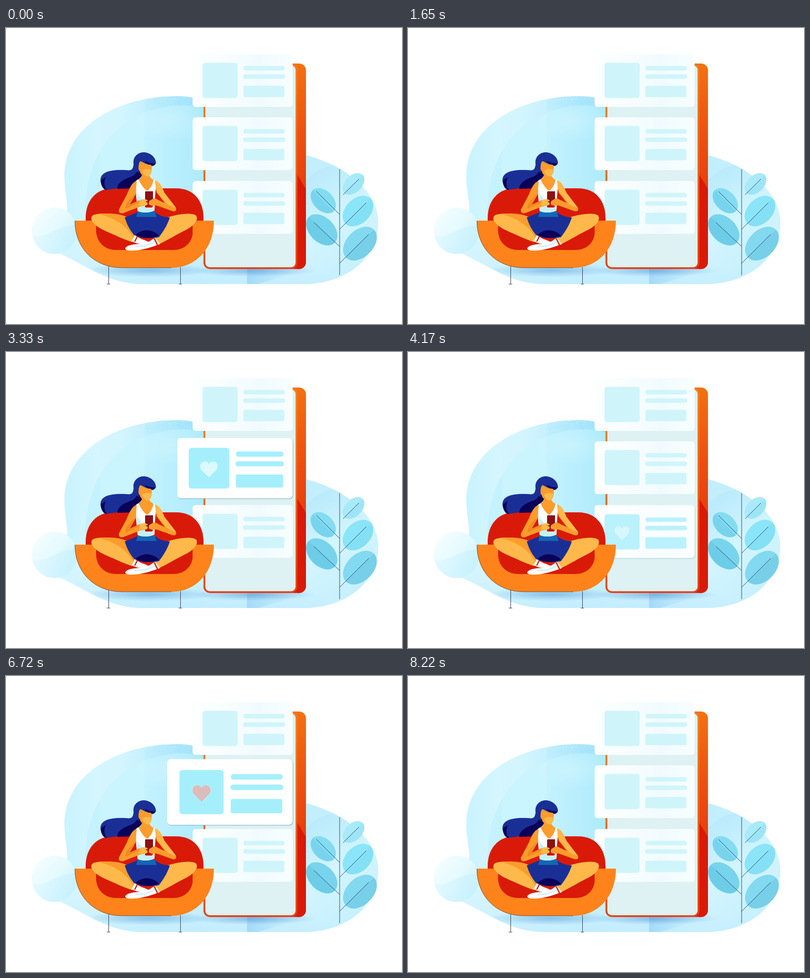
Animation, 800 px wide and 600 px high, one loop 8.52 s. Source, as an HTML page with a canvas:

```html
<!DOCTYPE html>
<html lang="en">
<head>
<meta charset="utf-8">
<title>Browsing cards</title>
<style>
  html, body { margin: 0; width: 100%; height: 100%; overflow: hidden; background: #fff; }
  canvas { display: block; }
</style>
</head>
<body>
<canvas id="stage" width="800" height="600"></canvas>
<script>
const LOOP = 8520, STEP = 30, GROWTH = 0.256, RIGHT = 579;
const NAVY = '#1a2f96', INK = '#0a0358', RED = '#d91a08', SKIN = '#ffb94a', TAN = '#fb9c2c', CYAN = '#a5effd';

const ctx = document.getElementById('stage').getContext('2d');
const makeLayer = () => {
  const c = document.createElement('canvas');
  c.width = 800;
  c.height = 600;
  return c.getContext('2d');
};

const shape = (g, d, color) => { g.fillStyle = color; g.fill(new Path2D(d)); };
const line = (g, d, color, width = 1) => {
  g.strokeStyle = color;
  g.lineWidth = width;
  g.stroke(new Path2D(d));
};
const box = (g, x, y, w, h, r, color) => {
  g.fillStyle = color;
  g.beginPath();
  g.roundRect(x, y, w, h, r);
  g.fill();
};
const oval = (g, x, y, rx, ry, angle, color) => {
  g.fillStyle = color;
  g.beginPath();
  g.ellipse(x, y, rx, ry, angle * Math.PI / 180, 0, 7);
  g.fill();
};
const blend = (g, x0, y0, x1, y1, ...colors) => {
  const fill = g.createLinearGradient(x0, y0, x1, y1);
  colors.forEach((c, i) => fill.addColorStop(i / (colors.length - 1), c));
  return fill;
};
const glow = (g, x, y, rx, ry, color) => {
  g.save();
  g.translate(x, y);
  g.scale(1, ry / rx);
  const fill = g.createRadialGradient(0, 0, 0, 0, 0, rx);
  fill.addColorStop(0, `rgba(${color})`);
  fill.addColorStop(1, `rgba(${color.replace(/[^,]+$/, '0')})`);
  oval(g, 0, 0, rx, rx, 0, fill);
  g.restore();
};

// ---------- Static scene ----------

function drawBackdrop(g) {
  const blob = 'M118 300 C118 200 225 138 345 138 C450 138 500 232 606 258 C680 276 752 330 752 392 ' +
    'C752 465 690 519 600 519 L275 519 C205 518 165 482 108 457 L124 365 C122 340 118 320 118 300Z';
  g.save();
  g.clip(new Path2D(blob));
  g.fillStyle = blend(g, 100, 0, 752, 0, '#d2f6ff', '#cff4fe', '#a4e4fc', '#a8e4fb', '#c3effd', '#c2effd');
  g.fillRect(0, 0, 800, 600);
  g.fillStyle = blend(g, 118, 0, 190, 0, 'rgba(190,240,254,.45)', 'rgba(222,249,255,.4)');
  g.fillRect(100, 130, 90, 260);
  shape(g, 'M160 390 C155 235 245 157 360 157 C430 157 480 220 520 290 L520 400Z',
    blend(g, 160, 0, 400, 0, '#c4f2fe', '#c4f2fe', '#aeebfc'));
  g.fillStyle = 'rgba(222,248,255,.2)';
  g.fillRect(190, 130, 90, 260);
  glow(g, 330, 190, 80, 40, '225,250,255,.35');
  g.fillStyle = blend(g, 0, 380, 0, 519, 'rgba(220,247,255,0)', 'rgba(214,245,255,.75)', 'rgba(198,238,254,.9)');
  g.fillRect(100, 380, 660, 140);
  oval(g, 670, 390, 92, 112, 0, blend(g, 600, 280, 730, 500, '#b4e8fb', '#d3f5fe', '#c4effd'));
  shape(g, 'M487 488 H600 C570 500 540 510 510 519 H487Z',
    blend(g, 487, 0, 600, 0, 'rgba(130,198,240,.5)', 'rgba(190,232,252,.1)'));
  glow(g, 290, 491, 130, 14, '92,160,215,.6');
  glow(g, 500, 492, 125, 12, '80,145,210,.55');

  let seed = 7;
  const random = () => (seed = seed * 16807 % 2147483647) / 2147483647;
  g.fillStyle = 'rgba(255,255,255,.45)';
  for (let i = 0; i < 160; i++) g.fillRect(255 + random() * 115, 138 + random() ** 2 * 24, 1, 1);
  g.restore();

  oval(g, 98, 411, 46, 47, 0, blend(g, 62, 380, 135, 440, '#f3fdff', '#e4faff', '#c6f2fe'));
  shape(g, 'M54 420 C80 432 105 395 143 402 C146 432 128 458 98 458 C75 458 58 442 54 420Z',
    blend(g, 60, 410, 135, 445, '#e4f9ff', '#c6f1fe'));
}

function drawPlant(g) {
  const leaves = [
    [702, 316, 26, 17, -45, '#a9eaf8', '#9de5f6'],
    [641, 350, 30, 20, 45, '#83dcf1', '#78d4ec'],
    [711, 371, 36, 25, -45, '#8be5f8', '#84e0f4'],
    [638, 409, 37, 25, 45, '#78d4ec', '#6dcde7'],
    [715, 437, 40, 27, -45, '#83d9ef', '#77cfe8']
  ];
  for (const [x, y, rx, ry, angle, light, dark] of leaves) {
    oval(g, x, y, rx, ry, angle, light);
    g.save();
    g.translate(x, y);
    g.rotate(angle * Math.PI / 180);
    shape(g, `M${-rx} 0 A${rx} ${ry} 0 0 0 ${rx} 0Z`, dark);
    g.restore();
  }
  line(g, 'M674 286 V501 M681 338 L713 306 M627 331 L674 378 M674 408 L728 354 M622 394 L674 443 M674 477 L733 418',
    '#2b4680');
}

function drawDevice(g) {
  box(g, 399, 72, 207, 416.5, 14, blend(g, 0, 72, 0, 488, '#f4710f', '#ec5210', '#e63c0c', RED));
  g.save();
  g.beginPath();
  g.roundRect(399, 72, 207, 416.5, 14);
  g.clip();
  shape(g, 'M588 297 L606 326 V489 H588Z', RED);
  g.restore();
  box(g, 399, 73, 189.5, 415, 12, blend(g, 0, 73, 0, 488, '#f58122', '#f0641a', '#e8400f'));
  box(g, 402.5, 76, 182.5, 409, 9, '#def1f3');
}

const cardTops = [53, 181, 310.3];

function drawCardFace(g, y, color) {
  box(g, 397, y + 17.5, 71, 71.5, 5, color);
  box(g, 479.5, y + 24, 83.5, 9, 4.5, color);
  box(g, 479, y + 41, 85, 9, 4.5, color);
  box(g, 479.5, y + 64.3, 82.8, 23, 3, color);
}

function drawRestingCards(g) {
  for (const y of cardTops) {
    box(g, 377, y, 202, 107, 6, blend(g, 377, 0, 579, 0, '#fdffff', '#f8fdff', '#f1fbff', '#f8feff'));
    drawCardFace(g, y, '#cff5fb');
  }
}

function drawSofa(g) {
  line(g, 'M207.5 482 V519 M203.5 519 H210.5 M352.5 485 V519 M349 519 H355.5', '#2f3b58');
  shape(g, 'M161 400 V385 C161 350 182 325 216 325 H344 C379 325 399 350 399 385 V400Z', RED);
  shape(g, 'M139 390.5 H420 C420 446 385 486 334 486 H234 C178 486 139 446 139 390.5Z', '#ff831b');
  line(g, 'M139.3 391 C139.3 446 178 486 234 486 H334', '#5a3a35', 0.8);
  shape(g, 'M182 388 H377 V418 C374 438 358 450 338 450 H222 C200 450 182 434 182 410Z', RED);
}

function drawWoman(g) {
  // hair behind the body
  shape(g, 'M259 270 C256 284 258 290 243 288 C211 286 190 292 191 309 C192 322 198 328 204 328 ' +
    'C226 324 244 325 258 313 C270 305 276 301 277 291 L270 268Z', NAVY);
  shape(g, 'M225 326 C224 314 239 306 254 301 C265 297 268 282 267 268 L277 290 C275 302 270 306 262 309 L258 325Z', INK);
  shape(g, 'M191 309 C193 322 198 329 204 328 C197 320 198 309 202 302Z', INK);

  // legs and shorts
  shape(g, 'M244 383 C216 376 183 373 174 381 C168 390 180 402 200 411 C222 421 240 429 255 434 L266 422 C255 409 248 398 244 383Z', SKIN);
  shape(g, 'M190 378 C215 373 235 379 244 383 L264 422 L258 427 C247 405 225 386 190 378Z', TAN);
  shape(g, 'M320 386 C345 377 374 373 384 380 C390 388 380 402 360 411 C338 422 320 434 307 439 L299 424 C309 412 316 400 320 386Z', SKIN);
  shape(g, 'M240 384 L267 373 H301 C310 381 320 383 331 384 C326 400 318 412 309 424 C290 428 270 426 259 420 C250 409 244 398 240 384Z', NAVY);
  shape(g, 'M262 419 C270 412 278 410 284 410 C294 410 303 414 309 421 C294 428 272 427 262 419Z', INK);
  shape(g, 'M266 372 H301 L304 383 H263Z', '#1267b4');

  // feet
  shape(g, 'M260 420 L270 426 C278 430 288 432 291 436 C278 440 263 438 254 432Z', '#fff');
  line(g, 'M265.5 422 L260 433', RED, 2.5);
  shape(g, 'M301 425 L311 438 C294 444 278 450 258 451 C247 452 240 450 241 446 C246 439 260 438 272 438 C284 437 291 432 301 425Z', '#fff');
  shape(g, 'M265 440 C280 442 292 437 301 429 L303 432 C294 442 278 446 258 444Z', '#d6f4fa');
  line(g, 'M299.5 426.5 L306 440', RED, 2.5);

  // torso
  shape(g, 'M263 309 C270 306 275 304 275 294 H289 C289 303 294 306 301 309 L306 325 L287 340 L263 330Z', TAN);
  shape(g, 'M264 309 L268 307 C272 317 279 326 285 330 C291 326 297 317 298 307 L302 309 ' +
    'C304 324 301 333 301 345 L300 370 C290 375 275 375 266 371 C264 345 260 330 264 309Z', '#fff');
  shape(g, 'M264 331 C270 345 282 355 298 358 L300 370 C290 375 275 375 266 371Z', '#c5f1fa');

  // arms, handset and hands
  shape(g, 'M264 310 C255 312 249 325 244 338 L228 368 C227 376 233 377 240 374 L271 362 L285 360 L284 348 L270 349 L250 358 L262 337Z', TAN);
  shape(g, 'M262 334 L248 359 L270 350 L268 354 L242 366 C240 362 244 355 250 347Z', '#f08820');
  shape(g, 'M301 309 C311 312 315 322 320 334 L343 364 C346 372 340 373 333 370 L305 360 L297 359 L294 349 L302 346 L321 355 L304 333Z', TAN);
  shape(g, 'M302 310 C311 312 315 322 320 334 L343 364 C338 365 332 360 324 356 L304 331Z', SKIN);
  box(g, 283, 331, 16, 34, 3, '#fff');
  box(g, 281, 331, 15.5, 33, 2.5, '#c9140c');
  shape(g, 'M282 331 H297 V352 L281 363 V333Z', '#8d1016');
  shape(g, 'M270 350 L277 347 C284 347 287 349 286 351 L281 352 L286 354 L286 358 C280 362 273 361 269 360Z', SKIN);
  shape(g, 'M306 348 L300 345 C295 347 292 349 289 351 L288 357 C293 361 299 361 305 358Z', TAN);

  // head
  shape(g, 'M267 272 C267 263 282 262 292 268 C297 278 295 294 288 299 C281 302 272 299 270 290 C266 286 266 280 267 272Z', TAN);
  shape(g, 'M275 289 C280 285 290 285 295 288 C294 295 291 300 286 301 C280 300 277 296 275 289Z', SKIN);
  shape(g, 'M258 277 C255 262 266 252 278 252 C291 252 303 262 303 274 C300 280 295 281 292 277 ' +
    'C283 278 277 271 271 270 C267 275 267 286 269 294 C260 290 258 284 258 277Z', NAVY);
  shape(g, 'M280 269 C287 273 294 275 302 274 C300 280 295 281 292 277 C286 277 282 273 280 269Z', INK);
}

const paint = (...draws) => {
  const g = makeLayer();
  draws.forEach(draw => draw(g));
  return g.canvas;
};
const clearWhite = g => { g.fillStyle = '#fff'; g.fillRect(0, 0, 800, 600); };
const background = paint(clearWhite, drawBackdrop, drawPlant, drawDevice, drawRestingCards);
const foreground = paint(drawSofa, drawWoman);

// ---------- Animated card ----------

const layer = makeLayer();
const LIFT = 1.5; // an active card sits slightly below its resting place
const anchors = [171, 237, 358];
const HEART = 'M0 14 L-12.5 1.5 C-17.5 -3.5 -15.5 -14 -7.5 -14 C-4 -14 -1 -12 0 -9.5 ' +
  'C1 -12 4 -14 7.5 -14 C15.5 -14 17.5 -3.5 12.5 1.5Z';
const visits = [
  { card: 0, start: 630, end: 1530, steps: 5 },
  { card: 1, start: 2400, end: 3300, steps: 5 },
  { card: 2, start: 4170, end: 5070, steps: 5 },
  { card: 1, start: 5970, end: 7950, steps: 10, like: 6720 }
];

const clamp = v => Math.max(0, Math.min(1, v));

function drawHeart(g, y, size, color, alpha) {
  g.save();
  g.translate(432.5, y + 55.5);
  g.scale(size, size);
  g.globalAlpha = alpha;
  shape(g, HEART, color);
  g.restore();
}

function drawVisit({ card, start, end, steps, like }, t) {
  const grow = clamp((t - start - STEP) / (9 * STEP));
  const left = t < end ? 1 : clamp(1 - ((t - end) / STEP + 1) / steps);
  if (left === 0) return;
  const scale = 1 + GROWTH * grow * left;
  const alpha = Math.min(1, ((t - start) / STEP + 1) / 2, left * 4);
  const y = cardTops[card] + LIFT, g = layer;

  g.clearRect(0, 0, 800, 600);
  g.save();
  g.translate(RIGHT, anchors[card]);
  g.scale(scale, scale);
  g.translate(-RIGHT, -anchors[card]);
  g.save();
  g.shadowColor = '#7fb0bc';
  g.shadowBlur = 1.5;
  g.shadowOffsetX = 0.8;
  g.shadowOffsetY = 1;
  box(g, 377, y, 202, 106, 6, '#fff');
  g.restore();
  drawCardFace(g, y, CYAN);
  drawHeart(g, y, 1, '#dbf9ff', 1);
  if (like && t >= like) {
    const k = Math.min(13, (t - like) / STEP);
    drawHeart(g, y, 0.97 + 0.8 * Math.sin(Math.PI * k / 13), RED, Math.min(1, (k + 1.1) / 4));
  }
  g.restore();

  ctx.globalAlpha = alpha;
  ctx.drawImage(g.canvas, 0, 0);
  ctx.globalAlpha = 1;
}

function render(now) {
  const t = Math.floor((now % LOOP) / STEP) * STEP;
  ctx.drawImage(background, 0, 0);
  const visit = visits.find(v => t >= v.start && t < v.end + v.steps * STEP);
  if (visit) drawVisit(visit, t);
  ctx.drawImage(foreground, 0, 0);
}

const begin = performance.now();
function frame() {
  render(performance.now() - begin);
  requestAnimationFrame(frame);
}
frame();
</script>
</body>
</html>
```
